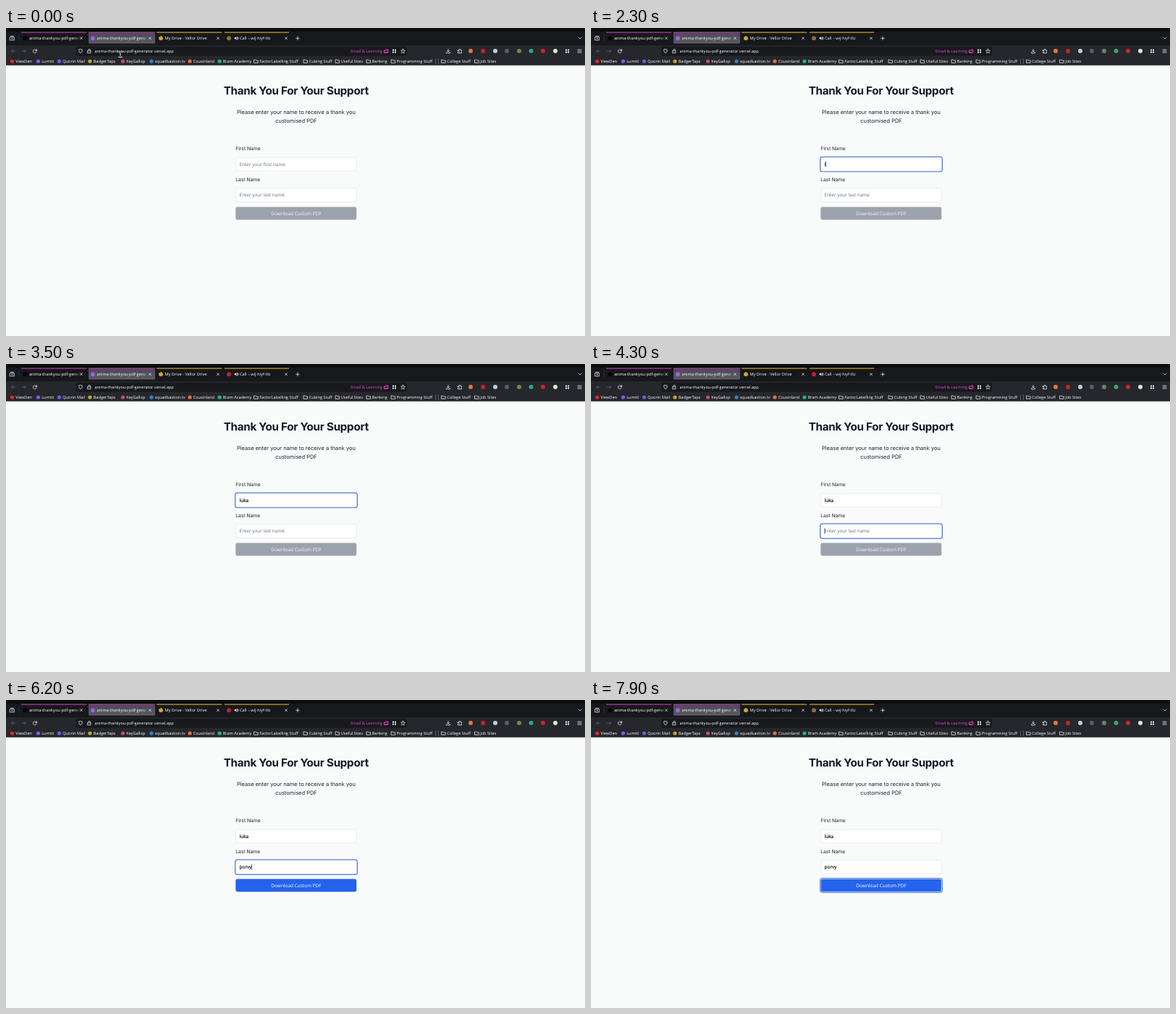
Animation of 800 by 426 pixels, one loop 8000 ms. Source, as an HTML page:

```html
<!DOCTYPE html>
<html lang="en">
<head>
<meta charset="utf-8">
<title>Thank you form</title>
<style>
  html, body { margin: 0; width: 100%; height: 100%; overflow: hidden; background: #f9fbfb; }
  svg { display: block; width: 100vw; height: 100vh; }
  text { font: 5.62px "Open Sans", "Noto Sans", sans-serif; fill: #fbfbfe; text-rendering: geometricPrecision; white-space: pre; }
  .page text { font-family: Inter, sans-serif; fill: #1a2230; }
  .page .title { font-size: 15.2px; font-weight: 700; letter-spacing: -0.28px; fill: #111827; }
  .page .lead { font-size: 7.5px; }
  .page .label { font-size: 6.75px; }
  .page .field { font: 6.42px "Open Sans", "Noto Sans", sans-serif; }
  .page .button { font: 6.48px "Open Sans", "Noto Sans", sans-serif; }
  .mid { text-anchor: middle; }
  .icon { fill: none; stroke: #f0f0f4; stroke-width: .75; stroke-linecap: round; stroke-linejoin: round; }
</style>
</head>
<body>
<svg id="stage" viewBox="0 0 800 426" preserveAspectRatio="none">
  <defs>
    <linearGradient id="fade">
      <stop offset=".88" stop-color="#fbfbfe"/>
      <stop offset="1" stop-color="#fbfbfe" stop-opacity="0"/>
    </linearGradient>
    <linearGradient id="activeTab" x2="0" y2="1">
      <stop stop-color="#4b4a54"/>
      <stop offset="1" stop-color="#5b5a65"/>
    </linearGradient>
  </defs>
  <rect width="800" height="426" fill="#f9fbfb"/>
  <g id="chrome">
    <rect width="800" height="51.7" fill="#25272c"/>
    <rect width="800" height="24" fill="#17181b"/>
    <rect width="800" height="5" fill="#0d0d0f"/>
    <rect x="97" y="25.8" width="457" height="12.6" rx="1.8" fill="#18191d"/>
  </g>
  <g class="page">
    <text class="title mid" x="400.8" y="92.4">Thank You For Your Support</text>
    <text class="lead mid" x="401" y="118.6">Please enter your name to receive a thank you</text>
    <text class="lead mid" x="401" y="130.6">customised PDF</text>
    <text class="label" x="317.2" y="169.2">First Name</text>
    <text class="label" x="317.2" y="211.8">Last Name</text>
    <g id="form"></g>
  </g>
  <g id="pointer">
    <g id="beam" fill="none" stroke-linecap="square">
      <path d="M-1.5-3.6Q0-3.6 0-2.6V2.6Q0 3.6-1.5 3.6M1.5-3.6Q0-3.6 0-2.6M0 2.6Q0 3.6 1.5 3.6" stroke="#fff" stroke-width="1.8"/>
      <path d="M-1.5-3.6Q0-3.6 0-2.6V2.6Q0 3.6-1.5 3.6M1.5-3.6Q0-3.6 0-2.6M0 2.6Q0 3.6 1.5 3.6" stroke="#111" stroke-width=".9"/>
    </g>
    <path id="arrow" d="M0 0V8L1.9 6.3 3.1 9 4.3 8.5 3.1 5.8H5.7Z" fill="#111" stroke="#fff" stroke-width=".5"/>
  </g>
</svg>
<script>
const LOOP = 8000;
const NS = "http://www.w3.org/2000/svg";
const byId = id => document.getElementById(id);
const chrome = byId("chrome"), form = byId("form");

const set = (el, attrs) => { for (const key in attrs) el.setAttribute(key, attrs[key]); };
function add(parent, tag, attrs, content = "") {
  const el = document.createElementNS(NS, tag);
  set(el, attrs);
  el.textContent = content;
  return parent.appendChild(el);
}
const show = (el, visible) => set(el, { visibility: visible ? "visible" : "hidden" });
const label = (x, y, content, style = "") => add(chrome, "text", { x, y, style }, content);
const dot = (x, y, fill, r = 2.6) => add(chrome, "circle", { cx: x, cy: y, r, fill });
const icon = (x, y, d, style = "") =>
  add(chrome, "path", { class: "icon", d, transform: `translate(${x} ${y})`, style });

const CROSS = "M-1.4-1.4 1.4 1.4M1.4-1.4-1.4 1.4";
const GRID = "M-2.5-2.5h2v2h-2zM.5-2.5h2v2h-2zM-2.5.5h2v2h-2zM.5.5h2v2h-2z";
const FOLDER = "M-2.6-2h2l.7.8h2.6v3.4h-5.3z";
const SOLID = "fill:#f0f0f4;stroke:none";
const DIM = "stroke:#6b6b74";

// Tabs
const PINK = "#c42fb0", YELLOW = "#c4a32c", CALL_IDLE = "#8c7430", CALL_RECORDING = "#c8202f";
const tabs = [
  [21, 111, PINK, "anima-thankyou-pdf-gener", "#000"],
  [114, 206, PINK, "anima-thankyou-pdf-gener", "#9a62e8"],
  [208, 298, YELLOW, "My Drive - Vellor Drive", "#c9a43a"],
  [302, 391, YELLOW, "Call – wij-hiyf-tlo", CALL_IDLE],
];
const favicons = tabs.map(([left, right, color, title, mark], i) => {
  if (i === 1) add(chrome, "rect", { x: left, y: 6, width: right - left, height: 15.5, rx: 1.6, fill: "url(#activeTab)" });
  add(chrome, "rect", { x: left, y: 5.5, width: right - left, height: 1.2, fill: color });
  label([32, 125.5, 219.5, 323][i], 16.2, title, i < 2 ? "fill:url(#fade)" : "");
  icon([104, 199, 293, 387][i], 14.2, CROSS);
  return dot([26.5, 120, 214, 308][i], 14.2, mark, 2.9);
});
icon(318, 14.2, "M-2.5-.9h1.2L.3-2.3v4.6L-1.3.9h-1.2z", SOLID);
icon(318, 14.2, "M1.3-1.2q1 1.2 0 2.4M2.2-2q1.7 2 0 4");
icon(403, 14.2, "M-2.4 0h4.8M0-2.4v4.8");
icon(793, 14, "M-2-1 0 1 2-1");
icon(8.5, 14.2, "M-2.8-1.6h5.6v4.2h-5.6zM-2-3h4M-1 .5h2");
icon(18, 14.2, "M0-4v8", "stroke:#4a4a52;stroke-width:.5");

// Navigation bar
icon(10, 32, "M2.6 0h-5.2M-.4-2.2-2.6 0-.4 2.2", DIM);
icon(25, 32, "M-2.6 0h5.2M.4-2.2 2.6 0 .4 2.2", DIM);
icon(40, 32, "M2.3-.8A2.5 2.5 0 1 0 2.3 1M2.5-2.7V-.7H.5");
icon(103, 32, "M0-2.8 2.4-1.9Q2.5 1.6 0 2.9-2.5 1.6-2.4-1.9z");
icon(115, 32, "M-2-.4h4v3h-4zM-1.3-.4v-1.1a1.3 1.3 0 0 1 2.6 0v1.1");
label(122.5, 34, "anima-thankyou-pdf-generator.vercel.app");
label(476, 34, "Email & Learning", "fill:#f045d8");
icon(525, 32, "M-2.6 1.4V-1.1h3.2v-1h2.2v3.5zM-2 2.2h1M1 2.2h1", "stroke:#f045d8;stroke-width:1");
icon(536.5, 32, GRID, SOLID);
icon(548.5, 32, "M0-2.9.9-1 2.9-.8 1.4.6 1.8 2.7 0 1.7-1.8 2.7-1.4.6-2.9-.8-.9-1z");
icon(611, 32, "M0-2.7v3.6M-1.6-.6 0 1 1.6-.6M-2.5 1.4v1.3h5V1.4");
icon(627, 32, "M-2.5-1.3H-.9a1 1 0 1 1 1.8 0h1.6v4h-5V1.4a1 1 0 1 0 0-1.6z");
const extensions = [
  [642, "#e07a3c"], [659, "#c9232d"], [676, "#c9cbd0"], [692, "#55606e"],
  [709, "#6c8a62"], [725.5, "#2fa47c"], [742, "#d3202f"], [759, "#e2e2e2"],
];
for (const [x, color] of extensions) dot(x, 31.8, color, 3);
icon(775.5, 32, GRID, SOLID);
icon(792.5, 32, "M-2.5-2h5M-2.5 0h5M-2.5 2h5");

// Bookmarks
const bookmarks = [
  [8.5, "ViewDen", "#f01f2d"], [44.5, "Lumitt", "#9150f5"], [73.5, "Quorin Mail", "#7358ee"],
  [116, "BadgerTaps", "#c9a52d"], [161.5, "KeyGallop", "#c8545a"], [201, "squadbastion.tv", "#3d7fd0"],
  [254, "Cousinland", "#e2703a"], [295, "Bram Academy", "#27b28d"],
  [345.5, "FactorLabelling Stuff"], [414, "Cubing Stuff"], [458, "Useful Sites"], [501, "Banking"],
  [535, "Programming Stuff"], [604.5, "College Stuff"], [650.5, "Job Sites"],
];
for (const [x, name, color] of bookmarks) {
  if (color) dot(x, 46, color); else icon(x, 46, FOLDER);
  label(x + 4.7, 48, name);
}
icon(593.5, 46, "M0-3.5v7M4-3.5v7", "stroke:#85858e;stroke-width:.6");

// Form
const BLUE = "#2563eb";
const roundRect = (x, y, width, height, rx, style) => add(form, "rect", { x, y, width, height, rx, style });
const ring = (y, height) => roundRect(316.6, y, 168.8, height, 3, "fill:#fff;stroke:#4a76d6;stroke-width:1.1");

function makeField(y, placeholder, value, keyTimes, focusAt, blurAt) {
  const outer = ring(y - .9, 20.6);
  const box = roundRect(317.5, y, 167, 18.8, 2.4, "fill:#fff;stroke-width:.6");
  const text = add(form, "text", { class: "field", x: 322.6, y: y + 11.6 });
  const caret = add(form, "rect", { y: y + 5.4, width: .6, height: 8, fill: "#111" });
  return t => {
    const typed = keyTimes.filter(k => t >= k).length;
    const focused = t >= focusAt && t < blurAt;
    const lastInput = typed ? keyTimes[typed - 1] : focusAt;
    const blinkOn = Math.floor((t - lastInput) / 600) % 2 === 0;
    text.textContent = typed ? value.slice(0, typed) : placeholder;
    text.style.fill = typed ? "#000" : "#656c78";
    text.style.stroke = typed ? "#000" : "none";
    text.style.strokeWidth = .16;
    box.style.stroke = focused ? "#a9bde8" : "#dde1e6";
    show(outer, focused);
    show(caret, focused && blinkOn);
    set(caret, { x: 322.6 + (typed ? text.getComputedTextLength() : 0) });
    return typed > 0;
  };
}
const drawFirst = makeField(179, "Enter your first name", "luka", [2200, 2450, 2650, 2850], 700, 4000);
const drawLast = makeField(221.8, "Enter your last name", "porvy", [4900, 5100, 5300, 5500, 5750], 4000, 6500);
const buttonRing = ring(246.5, 19.6);
const button = roundRect(317.3, 247.4, 167, 17.8, 2.4, "stroke-width:.5");
const buttonLabel = add(form, "text", { class: "button mid", x: 401, y: 258.5 }, "Download Custom PDF");

function drawPointer(t) {
  const p = Math.min(1, Math.max(0, (t - 100) / 500));
  const eased = p * p * (3 - 2 * p);
  const x = 158 + 207 * eased, y = 36.5 + 158 * eased;
  const overText = y < 39 || y > 179;
  set(byId("pointer"), { transform: `translate(${x} ${y})` });
  show(byId("pointer"), t < 2200);
  set(byId("beam"), { display: overText ? "inline" : "none" });
  set(byId("arrow"), { display: overText ? "none" : "inline" });
}

function draw(t) {
  drawFirst(t);
  const ready = drawLast(t), focused = t >= 6500;
  button.style.fill = ready ? BLUE : "#9ca3af";
  button.style.stroke = focused ? "#dfe8fb" : "none";
  buttonLabel.style.fill = ready ? "#fff" : "#f6f7f9";
  show(buttonRing, focused);
  const phase = t % 2600;
  set(favicons[3], { fill: phase >= 700 && phase < 2000 ? CALL_RECORDING : CALL_IDLE });
  drawPointer(t);
}

const start = performance.now();
function frame() {
  draw((performance.now() - start) % LOOP);
  requestAnimationFrame(frame);
}
frame();
</script>
</body>
</html>
```
